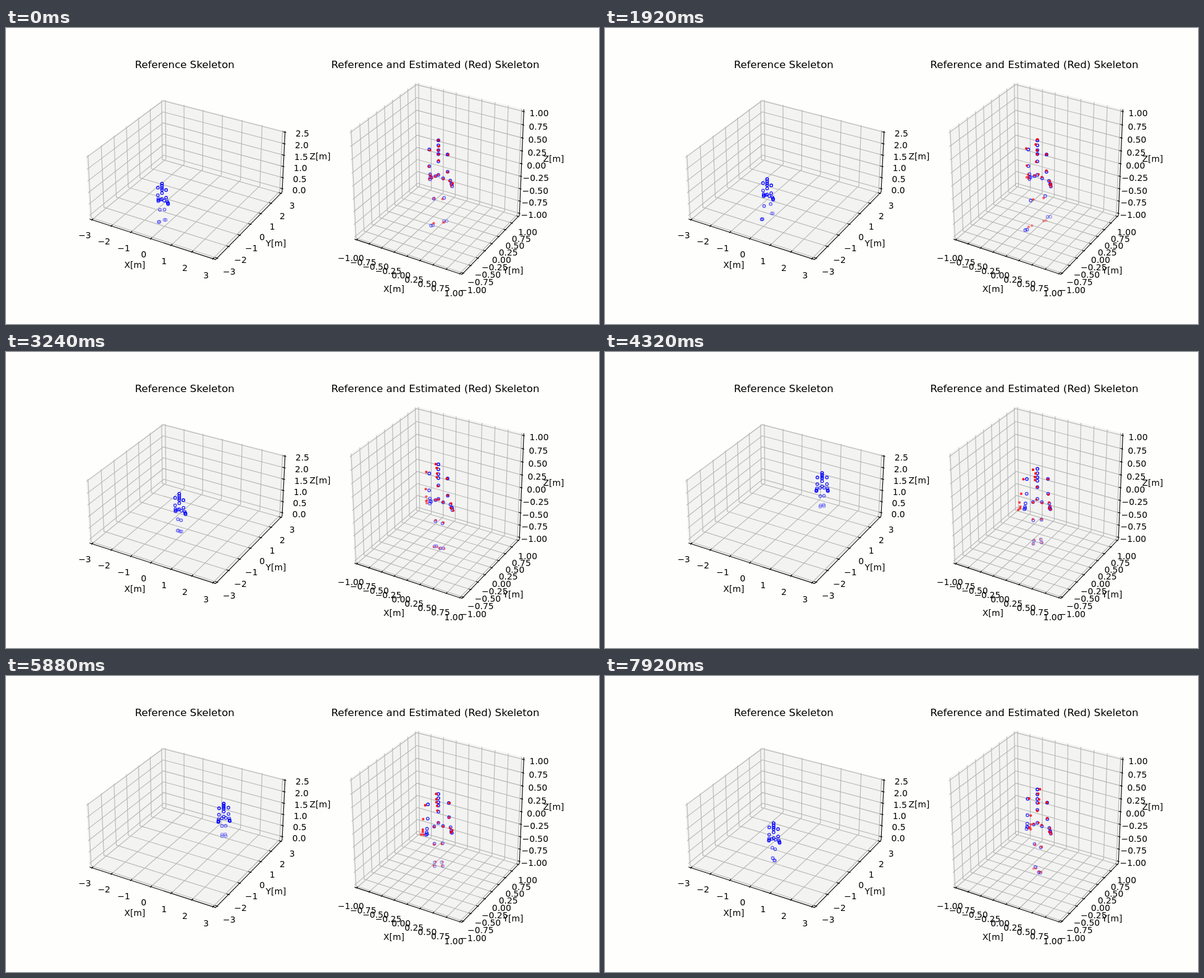
Recreate the animation shown at these times as an HTML page. Size 960 by 480 pixels, loop 8000 ms.

```html
<!DOCTYPE html>
<html lang="en">
<head>
<meta charset="utf-8">
<title>Skeleton plots</title>
<style>
  html, body { margin: 0; width: 100%; height: 100%; overflow: hidden; background: #fefefd; }
  svg { display: block; width: 960px; height: 480px; }
  text { font: 13.89px "DejaVu Sans", sans-serif; text-anchor: middle; }
  .title { font-size: 16.67px; }
  .pane { fill: #f3f3f1; }
  .grid { fill: none; stroke: #b5b5b5; stroke-width: 1.1; }
  .axis { fill: none; stroke: #000; stroke-width: 1.1; }
  .ring { fill: none; stroke: #00f; stroke-width: 1.4; }
  .dot { fill: #f00; }
</style>
</head>
<body>
<svg id="stage" viewBox="0 0 960 480"></svg>
<script>
const stage = document.getElementById('stage');

function add(tag, attrs, content = '') {
  const node = document.createElementNS('http://www.w3.org/2000/svg', tag);
  for (const name in attrs) node.setAttribute(name, attrs[name]);
  node.textContent = content;
  stage.append(node);
  return node;
}
const label = (x, y, content, cls = '') => add('text', { x, y, class: cls }, content);
const line = (points, cls) => add('polyline', { points: points.join(' '), class: cls });

// Perspective camera: elevation 30, azimuth -60, distance 10.
const nearness = (x, y, z) => 0.433 * x - 0.75 * y + 0.5 * z;

// The projection takes a, b, c running 0..1 over the data range.
function camera(cx, cy, half, halfZ) {
  return (a, b, c) => {
    const x = (2 * a - 1) * half, y = (2 * b - 1) * half, z = (2 * c - 1) * halfZ;
    const scale = 1824 / (10 - nearness(x, y, z));
    return [cx + (0.866 * x + 0.5 * y) * scale,
            cy - (-0.25 * x + 0.433 * y + 0.866 * z) * scale];
  };
}

const LO = -1 / 48, HI = 1 + 1 / 48, PAD = 0.116;

function ticks(from, to, step, digits) {
  const list = [];
  for (let v = from; v <= to + 1e-6; v += step) {
    list.push([v, v.toFixed(digits).replace('-', '\u2212')]);
  }
  return list;
}

function drawBox(project, flat, flatRange, upright, uprightRange) {
  const path = corners => corners.map(c => project(...c));
  const pane = corners => add('polygon', { points: path(corners).join(' '), class: 'pane' });
  pane([[LO, LO, LO], [LO, HI, LO], [LO, HI, HI], [LO, LO, HI]]);
  pane([[LO, HI, LO], [HI, HI, LO], [HI, HI, HI], [LO, HI, HI]]);
  pane([[LO, LO, LO], [HI, LO, LO], [HI, HI, LO], [LO, HI, LO]]);

  const axes = [
    { list: flat, range: flatRange,
      grid: u => [[u, LO, LO], [u, HI, LO], [u, HI, HI]],
      tick: u => [[u, LO - 0.009, LO], [u, LO + 0.017, LO]],
      text: u => [u, -PAD, -PAD] },
    { list: flat, range: flatRange,
      grid: u => [[HI, u, LO], [LO, u, LO], [LO, u, HI]],
      tick: u => [[HI + 0.009, u, LO], [HI - 0.017, u, LO]],
      text: u => [1 + PAD, u, -PAD] },
    { list: upright, range: uprightRange,
      grid: u => [[LO, LO, u], [LO, HI, u], [HI, HI, u]],
      tick: u => [[HI + 0.009, HI, u], [HI - 0.017, HI, u]],
      text: u => [1 + PAD, 1 + PAD, u] }
  ];
  const each = draw => axes.forEach(axis => axis.list.forEach(([value, name]) =>
    draw(axis, (value - axis.range[0]) / (axis.range[1] - axis.range[0]), name)));

  each((axis, u) => line(path(axis.grid(u)), 'grid'));
  line(path([[LO, LO, LO], [HI, LO, LO], [HI, HI, LO], [HI, HI, HI]]), 'axis');
  each((axis, u, name) => {
    line(path(axis.tick(u)), 'axis');
    const [x, y] = project(...axis.text(u));
    label(x, y + 11, name);
  });
}

const bodyView = camera(700, 238.2, 0.528, 0.528);
const unit = ticks(-1, 1, 0.25, 2);
drawBox(camera(294.2, 238.1, 0.61, 0.305), ticks(-3, 3, 1, 0), [-3, 3], ticks(0, 2.5, 0.5, 1), [-0.1, 2.5]);
drawBox(bodyView, unit, [-1, 1], unit, [-1, 1]);

label(289.3, 64.5, 'Reference Skeleton', 'title');
label(695, 64.5, 'Reference and Estimated (Red) Skeleton', 'title');
for (const [x, y] of [[208.5, 389], [628, 428]]) label(x, y, 'X[m]');
for (const [x, y] of [[437, 354], [821, 398]]) label(x, y, 'Y[m]');
for (const [x, y] of [[508.5, 213], [886.5, 217]]) label(x, y, 'Z[m]');

const LOOP = 8000, STEP = 120, GAIT = 1055, STRIDE = 0.28, WORLD_SCALE = 0.45;

// Where the hips stand in the left plot, and how far the walker has turned round.
const walk = [
  { t: 0, x: 252.5, y: 277.5, turn: 0 },
  { t: 1920, x: 262.5, y: 270, turn: 0 },
  { t: 3240, x: 280.5, y: 255, turn: 0 },
  { t: 4320, x: 351.5, y: 218, turn: 0.8 },
  { t: 5880, x: 352.5, y: 228, turn: 1 },
  { t: 7080, x: 358, y: 239.5, turn: 1 },
  { t: 7920, x: 273, y: 263, turn: 0.2 }
];

// Body in metres from the hips: distance to the side, ahead and up; share of stride and drift.
const spine = [0.66, 0.565, 0.475, 0.4, 0.26, 0];
const limbs = [
  { side: 0.175, ahead: 0, up: 0.44, swing: 0, drift: 1.2 },
  { side: 0.18, ahead: 0, up: 0.115, swing: -0.03, drift: 1.6 },
  { side: 0.2, ahead: 0.06, up: -0.08, swing: -0.06, drift: 1.6 },
  { side: 0.21, ahead: 0.08, up: -0.15, swing: -0.06, drift: 1.6 },
  { side: 0.22, ahead: 0.09, up: -0.2, swing: -0.06, drift: 1.6 },
  { side: 0.205, ahead: 0.11, up: -0.17, swing: -0.06, drift: 1.6 },
  { side: 0.075, ahead: 0.03, up: -0.06, swing: 0, drift: 0 },
  { side: 0.07, ahead: 0.02, up: -0.47, swing: 0.45, drift: 0 },
  { side: 0.06, ahead: -0.03, up: -0.95, swing: 1, drift: 0 },
  { side: 0.07, ahead: 0.05, up: -0.99, swing: 1, drift: 0 }
];

function walkerAt(time) {
  const next = Math.max(1, walk.findIndex(key => key.t >= time));
  const from = walk[next - 1], to = walk[next];
  const part = (time - from.t) / (to.t - from.t);
  const mix = name => from[name] + (to[name] - from[name]) * part;
  return { time, x: mix('x'), y: mix('y'), turn: mix('turn') };
}

// Joint positions in metres; the estimate strides less, drifts sideways and wobbles.
function skeleton({ time, turn }, estimated) {
  const yaw = 0.66 * turn, height = 1 - 0.16 * turn, heading = 1 - 1.9 * turn;
  const lateral = [Math.cos(yaw), Math.sin(yaw)];
  const stride = STRIDE * (estimated ? 0.5 : 1) * Math.cos(2 * Math.PI * (time - 1920) / GAIT);
  const progress = time / 7200;
  const drift = estimated ? -0.1 * progress * Math.sin(Math.PI * progress) : 0;
  const joints = [];

  function joint(side, ahead, up) {
    const wobble = k => estimated ? 0.014 * Math.sin(joints.length * k + time / 900) : 0;
    const forward = ahead * heading;
    joints.push([
      side * lateral[0] - forward * lateral[1] + wobble(2.4),
      side * lateral[1] + forward * lateral[0] + wobble(3.7),
      up * height + wobble(5.1)
    ]);
  }
  spine.forEach(up => joint(drift * up * 1.4, 0, up));
  for (const sign of [-1, 1]) {
    for (const limb of limbs) {
      const shift = sign < 0 ? drift * limb.drift : 0;
      joint(sign * limb.side + shift, limb.ahead + sign * limb.swing * stride, limb.up);
    }
  }
  return joints;
}

const markers = (cls, r) =>
  skeleton(walkerAt(0), false).map(() => add('circle', { class: cls, r }));

// Farther joints fade.
function place(circles, joints, move = p => p) {
  const depths = joints.map(p => nearness(...p));
  const far = Math.min(...depths), near = Math.max(...depths);
  joints.forEach((p, i) => {
    const [x, y] = move(bodyView(...p.map(v => (v + 1) / 2)));
    circles[i].setAttribute('cx', x.toFixed(2));
    circles[i].setAttribute('cy', y.toFixed(2));
    circles[i].setAttribute('opacity', 0.35 + 0.65 * (depths[i] - far) / (near - far));
  });
}

const worldRings = markers('ring', 2.2);
const bodyRings = markers('ring', 2.2);
const bodyDots = markers('dot', 2.1);
const hip = bodyView(0.5, 0.5, 0.5);

function render(elapsed) {
  const walker = walkerAt(Math.floor((elapsed % LOOP) / STEP) * STEP);
  const reference = skeleton(walker, false);
  place(worldRings, reference, ([x, y]) =>
    [walker.x + (x - hip[0]) * WORLD_SCALE, walker.y + (y - hip[1]) * WORLD_SCALE]);
  place(bodyRings, reference);
  place(bodyDots, skeleton(walker, true));
}

const start = performance.now();
function frame() {
  render(performance.now() - start);
  requestAnimationFrame(frame);
}
frame();
</script>
</body>
</html>
```
